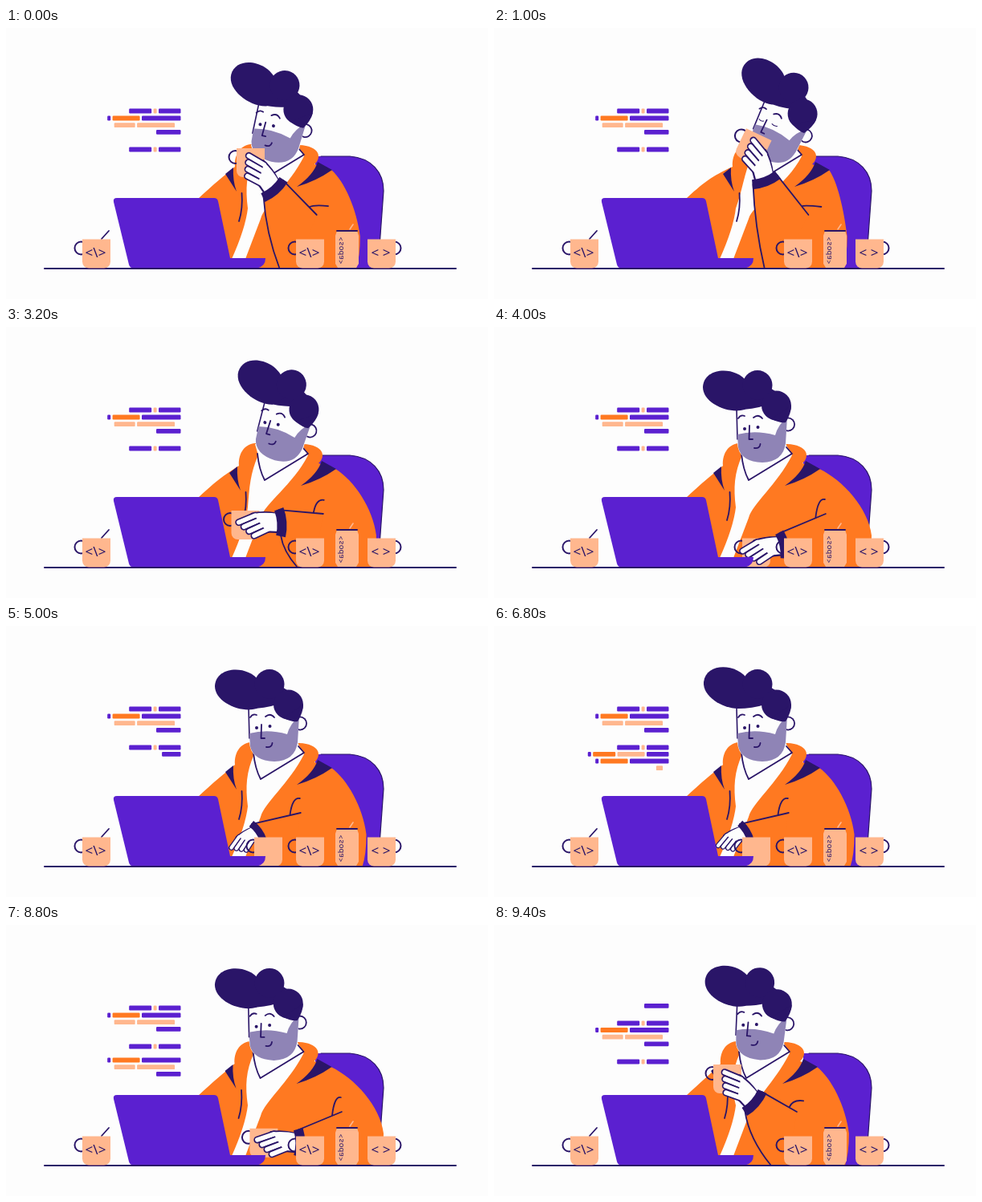
An HTML page with a canvas that plays this animation: 600 px wide and 338 px high, repeating every 9.6 s.

```html
<!DOCTYPE html>
<html lang="en">
<head>
<meta charset="utf-8">
<title>Coding with coffee</title>
<style>
html, body { margin: 0; width: 100%; height: 100%; overflow: hidden; background: #fdfdfd; }
canvas { display: block; width: 600px; height: 338px; }
</style>
</head>
<body>
<canvas id="stage" width="600" height="338"></canvas>
<script>
const ctx = document.getElementById('stage').getContext('2d');
const LOOP = 9600, STEP = 200, TYPE_START = 4500, TYPE_END = 7700;
const PAPER = '#fdfdfd', NAVY = '#2a1568', PURPLE = '#5b20d0', ORANGE = '#ff7921', PEACH = '#ffb78e', BEARD = '#8f84b6';

// A pose is body lean, head tilt, the point the hand holds, and the hand's direction in degrees.
// Head, arm, jacket and mug all follow from it.
const sip = [0, 13.5, 304.5, 168, -131];
const drink = [12, 24, 322, 149, -111];
const lower = [5, 16, 298, 247, -184];
const table = [0, 0, 326.5, 281.5, -186];
const keys = [0, 0, 278, 282, -216];
const reach = [0, 0, 303, 252, -184];
const lift = [-3, 4, 290.5, 192, -139];
const timeline = [[0, sip], [1000, drink], [2400, drink], [3200, lower], [3800, table],
  [TYPE_START, keys], [TYPE_END, keys], [8200, reach], [8600, table], [9400, lift]];

// Monotone cubic interpolation around the loop
function poseAt(t) {
  const n = timeline.length;
  const key = i => {
    const lap = Math.floor(i / n), [time, pose] = timeline[i - lap * n];
    return { time: time + lap * LOOP, pose };
  };
  const i = timeline.findLastIndex(([time]) => time <= t);
  const [k0, k1, k2, k3] = [-1, 0, 1, 2].map(o => key(i + o));
  const span = k2.time - k1.time, u = (t - k1.time) / span;
  return k1.pose.map((a, c) => {
    const slope = (p, q) => (q.pose[c] - p.pose[c]) / (q.time - p.time);
    const tangent = (d, e) => d * e > 0 ? 2 * d * e / (d + e) : 0;
    const mid = slope(k1, k2);
    const m1 = tangent(slope(k0, k1), mid) * span, m2 = tangent(mid, slope(k2, k3)) * span;
    return a + (k2.pose[c] - a) * u * u * (3 - 2 * u) + m1 * u * (1 - u) ** 2 - m2 * u * u * (1 - u);
  });
}

const clamp = (v, lo = 0, hi = 1) => Math.min(hi, Math.max(lo, v));
const radians = deg => deg * Math.PI / 180;
const fill = (d, color) => { ctx.fillStyle = color; ctx.fill(new Path2D(d)); };
const line = (d, width = 1.8, color = NAVY) => {
  ctx.strokeStyle = color;
  ctx.lineWidth = width;
  ctx.stroke(new Path2D(d));
};
const disc = (x, y, r, color) => { ctx.fillStyle = color; ctx.beginPath(); ctx.arc(x, y, r, 0, 7); ctx.fill(); };
const box = (x, y, w, h, r, color) => {
  ctx.fillStyle = color;
  ctx.beginPath();
  ctx.roundRect(x, y, w, h, r);
  ctx.fill();
};
function placed(x, y, angle, draw) {
  ctx.save();
  ctx.translate(x, y);
  ctx.rotate(angle);
  draw();
  ctx.restore();
}
function label(text, x, y, font) {
  ctx.font = font;
  ctx.fillStyle = NAVY;
  ctx.fillText(text, x, y);
}

// Bars of a code line from right to left: colour letter and width
const opening = 'P27.5 S4 P28';
const block = ['P48.5 O34 P4', 'W5 S47 S26', 'P30.5'];
const extra = 'P27.5 S34 O28 P4';
const barColors = { P: PURPLE, O: ORANGE, S: PEACH, W: PAPER };

function drawCode(t) {
  const scroll = 48 * clamp((t - 9095) / 505), collapse = 8.5 * clamp((t - 8800) / 295);
  let ink = 0;
  function row(y, spec, limit = Infinity) {
    let right = 217.5;
    for (const bar of spec.split(' ')) {
      const width = Math.min(+bar.slice(1), limit);
      if (width > 0) box(right - width, y - scroll - 2.9, width, 5.8, 1.2, barColors[bar[0]]);
      right -= +bar.slice(1) + 2.4;
      limit -= +bar.slice(1) + 2.4;
    }
    return 217.5 - right;
  }
  const typed = (y, spec) => { ink -= row(y, spec, ink); };
  ctx.save();
  ctx.beginPath();
  ctx.rect(110, 96, 120, 96);
  ctx.clip();
  row(103.5, opening);
  block.forEach((spec, i) => row(112.5 + i * 8.7, spec));
  row(151.5, opening);
  ink = 0.105 * (t - 4777);
  if (t < 8800) typed(159.8, extra);
  block.forEach((spec, i) => typed(168.5 + i * 8.7 - collapse, spec));
  row(208 - collapse, opening);
  ctx.restore();
}

function drawMug(handle = -19) {
  ctx.strokeStyle = NAVY;
  ctx.lineWidth = 2;
  ctx.beginPath();
  ctx.arc(handle, -7, 8, 0, 7);
  ctx.stroke();
  box(-17.5, -18, 35, 36, [0, 0, 8, 8], PEACH);
}

function drawTorso(lean, elbow) {
  const x = v => v + lean, shoulder = x(405) + .45 * (elbow - x(405));
  fill(`M238 214C258 195 272 184 ${x(285)} 173C${x(284)} 160 ${x(290)} 147 ${x(304)} 145L${x(365)} 146
    C${x(390)} 147 ${x(394)} 161 ${x(384)} 170L${x(405)} 177C${shoulder} 191 ${elbow - 4} 226 ${elbow} 260
    Q${elbow} 285 ${elbow - 5} 300H250Z`, ORANGE);
  fill(`M${x(305)} 146L${x(309)} 160C${x(299)} 182 ${x(298)} 200 301 225Q298 250 281 288H298L317 238
    C322 220 ${x(352)} 197 ${x(371)} 160L${x(363)} 146Z`, PAPER);
  line(`M${x(308)} 158Q${x(310)} 178 ${x(317)} 191L${x(371)} 158L${x(364)} 150`);
  fill(`M${x(273)} 182L${x(283)} 174Q${x(282)} 190 ${x(287)} 204Z`, NAVY);
  fill(`M${x(362)} 198Q${x(383)} 183 ${x(388)} 167L${x(406)} 177Q${x(386)} 191 ${x(362)} 198Z`, NAVY);
  line(`M${x(293.5)} 206Q${x(295)} 225 ${x(290)} 241`);
}

// Local frame of an arm: origin at the wrist, x towards the fingertips
function drawSleeve(wrist, dir, size) {
  const nx = -16 * size * Math.sin(dir), ny = 16 * size * Math.cos(dir);
  const [ax, ay, bx, by] = [wrist.x + nx, wrist.y + ny, wrist.x - nx, wrist.y - ny];
  const ex = wrist.x + 54, ey = 233, raised = clamp((250 - wrist.y) / 55);
  const cx = ex - 1 + 17 * raised, cy = ey - 18 + 8 * raised;
  const sx = ax + (ex - ax) * .78, sy = ay + (ey - ay) * .78;
  const hem = wrist.x + Math.min(22, .75 * (wrist.y - 190));
  const seam = `Q${bx + (hem - bx) * .15} ${(by + 300) / 2} ${hem} 300`;
  fill(`M${bx} ${by}${seam}H${hem + 20}L${ex} ${ey}L${ax} ${ay}Z`, ORANGE);
  line(`M${bx} ${by}${seam}M${ax} ${ay}L${ex} ${ey}M${sx} ${sy}Q${sx + (cx - sx) * .25} ${cy - 2} ${cx} ${cy}`);
}

function drawHand(wrist, dir, size) {
  placed(wrist.x, wrist.y, dir, () => {
    ctx.scale(size, size);
    line('M4 11Q20 15 34 13M4 -11L22 -9', 3.6);
    for (let i = 0; i < 4; i++) {
      const x = 36 - 5 * i, y = 12 - 6 * i, d = `M${x - 6} ${y - 1}L${x + 15 - i} ${y - 8}`;
      line(d, 9);
      line(d, 5.6, PAPER);
    }
    fill('M0 11Q20 15 32 13L18 -9L0 -11Z', PAPER);
    ctx.lineCap = 'butt';
    line('M0 -17Q-5 0 0 17', 12);
    ctx.lineCap = 'round';
  });
}

function drawHead(lean, tilt, bounce) {
  placed(330 + lean - .2 * tilt, 165 - .23 * tilt, radians(tilt), () => {
    ctx.translate(-330, -165);
    disc(366, 121.5, 9, NAVY);
    disc(366, 121.5, 7.2, PAPER);
    fill('M302 98H364V145Q360 168 334 169Q304 168 303 145Z', PAPER);
    line('M302 102L303 140', 1.6);
    fill('M303 134Q326 128 350 135Q353 123 365 112L363 145Q360 168 334 169Q308 168 304 150Z', BEARD);
    fill('M303 103Q322 103 337 98L350 80L322 62L296 80Z', NAVY);
    placed(322, 84, radians(bounce), () => {
      ctx.translate(-322, -84);
      fill('M312 103C292 109 260 95 260 75C261 50 300 48 315 68L326 90Z', NAVY);
    });
    disc(328, 72.5, 18.5, NAVY);
    disc(351.5, 98, 18.5, NAVY);
    fill('M345 115Q356 120 363 119Q370 108 370 98Z', NAVY);
    ctx.translate(-.17 * tilt, 0);
    line('M304 114Q307 109 312 111M323 113Q329 108 334 114');
    if (tilt > 20) {
      line('M309 126Q312 128 315 126M326 125Q330 127 333 125', 1);
    } else {
      disc(312, 127, 2, NAVY);
      disc(328.5, 125, 2, NAVY);
    }
    line('M318 123L317.5 140H322M324 151Q331 152 331.5 146');
  });
}

function drawDesk() {
  fill(`M138 212H259Q263 212 264 216L279 287H323Q323 297 313 299.5H158Q154 299 153 295
    L134 217Q133 212 138 212Z`, PURPLE);
  line('M48 300H560', 2);
  line('M119 263L128 253');
  [[112.5, -19, '<\\>'], [378.5, -19, '<\\>'], [467.5, 16, '< >']].forEach(([x, handle, text]) => {
    placed(x, 281.5, 0, () => drawMug(handle));
    label(text, x - 1, 285.8, '17px "Noto Sans", sans-serif');
  });
  fill('M412 253H437L439 259V294L436 299H413L410 294V259Z', PEACH);
  line('M412 253H437', 2);
  line('M428 251L432 245', 1.6, PEACH);
  placed(417, 277.5, Math.PI / 2, () => {
    ctx.scale(1, -1);
    label('<soda>', 0, 3, '9.6px "Noto Sans Mono", monospace');
  });
}

function render(t) {
  const [lean, tilt, holdX, holdY, degrees] = poseAt(t);
  const typing = t > TYPE_START && t < TYPE_END;
  const dir = radians(degrees), size = 1 - Math.max(0, -190 - degrees) / 100;
  const wrist = { x: holdX - 43 * Math.cos(dir), y: holdY - 43 * Math.sin(dir) };
  const elbow = Math.min(470, 171 + .35 * wrist.y + .6 * wrist.x);
  const [mugX, mugY] = t > 3800 && t < 8600 ? table.slice(2) : [holdX, holdY];
  const tap = typing ? Math.sin((t - 5000) * Math.PI / 400) : 0;
  const bounce = typing ? 5 * Math.sin((t - 5000) * Math.PI / 1200) ** 2 : 0;

  ctx.fillStyle = PAPER;
  ctx.fillRect(0, 0, 600, 338);
  drawCode(t);
  const chair = 'M392 160H428C455 162 470 180 470 203L463 300';
  fill(chair + 'H385V160Z', PURPLE);
  line(chair, 1.2);
  drawTorso(lean, elbow);
  drawHead(lean, tilt, bounce);
  drawSleeve(wrist, dir, size);
  const drawHeldMug = () => placed(mugX, mugY, radians(3.2 * Math.max(0, tilt - 16)), () => drawMug());
  if (typing) drawHand(wrist, dir + .08 * tap, size);
  drawHeldMug();
  if (!typing) drawHand(wrist, dir, size);
  drawDesk();
}

ctx.lineCap = ctx.lineJoin = 'round';
ctx.textAlign = 'center';
const start = performance.now();
function tick() {
  const t = (performance.now() - start) % LOOP;
  render(Math.floor(t / STEP) * STEP);
  requestAnimationFrame(tick);
}
tick();
</script>
</body>
</html>
```
